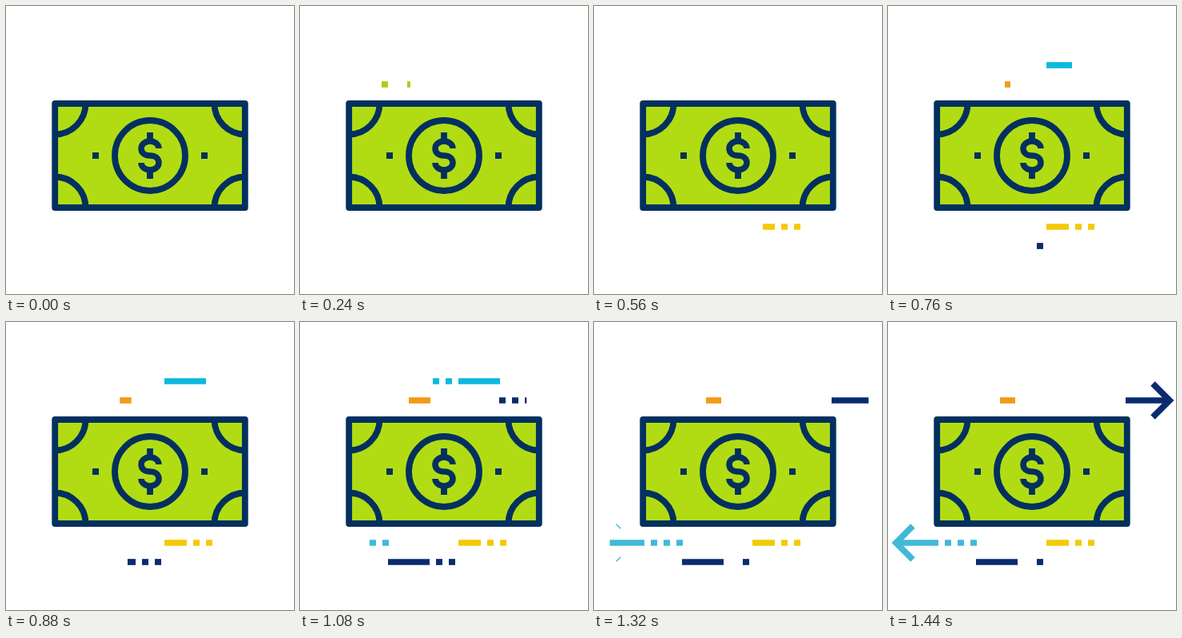
An HTML page that plays this animation: 360 by 360 pixels, repeating every 1.48 s.

```html
<!DOCTYPE html>
<html lang="en">
<head>
<meta charset="utf-8">
<title>Money transfer</title>
<style>
  html, body { margin: 0; width: 100%; height: 100%; overflow: hidden; background: #fff; }
  svg { display: block; width: 100vw; height: 100vh; }
</style>
</head>
<body>
<svg viewBox="0 0 360 360">
  <clipPath id="inside"><rect x="61" y="122" width="238" height="130"/></clipPath>
  <g id="trails" fill="none" stroke-width="7.7"></g>
  <g fill="none" stroke="#03305f" stroke-width="7.8" stroke-linejoin="round">
    <rect x="61.2" y="122" width="237.6" height="130" fill="#b1dc14"/>
    <g clip-path="url(#inside)">
      <circle cx="61" cy="122" r="38.5"/>
      <circle cx="299" cy="122" r="38.5"/>
      <circle cx="61" cy="252" r="38.5"/>
      <circle cx="299" cy="252" r="38.5"/>
    </g>
    <circle cx="180" cy="187" r="44"/>
    <path d="M180 158v11M180 205v11M108 187h8M244 187h8"/>
    <path stroke-width="7.5" d="M191 178A11 9 0 0 0 169 178C169 184 174 187 180 187S191 190 191 196A11 9 0 0 1 169 196"/>
  </g>
</svg>
<script>
const LOOP = 1480, STEP = 40;
const SPEED = 0.25; // px per ms, shared by every trail
const PITCH = 16, DOT = 8;
const green = '#a5d01b', yellow = '#f4ca07', cyan = '#0cb8dd', sky = '#41b9d7',
      orange = '#f39a18', navy = '#0a2b6d';

const clamp = (v, lo = 0, hi = 1) => Math.max(lo, Math.min(hi, v));

function newPath(color) {
  const el = document.createElementNS('http://www.w3.org/2000/svg', 'path');
  el.setAttribute('stroke', color);
  return document.getElementById('trails').appendChild(el);
}

// A row of dots followed by a line, uncovered by an edge that leaves `from`
// at `start`; a second edge wipes it away from `end` on.
const trails = [];
function trail({ y, color, dir, from, start, dots = 0, line = 0, end = Infinity }) {
  const parts = Array.from({ length: dots }, (_, i) => [i * PITCH, i * PITCH + DOT]);
  if (line) parts.push([dots * PITCH, dots * PITCH + line]);
  trails.push({ el: newPath(color), y, dir, from, start, end, parts });
}

function trailPath({ y, dir, from, start, end, parts }, t) {
  const head = Math.max(0, (t - start) * SPEED);
  const tail = Math.max(0, (t - end) * SPEED);
  return parts.map(([a, b]) => {
    const lo = Math.max(a, tail), hi = Math.min(b, head);
    return hi > lo ? `M${from + dir * lo} ${y}H${from + dir * hi}` : '';
  }).join('');
}

trail({ y: 98, color: green, dir: 1, from: 102, start: 96, dots: 1, end: 260 });
trail({ y: 98, color: green, dir: 1, from: 134, start: 224, line: 4, end: 260 });

trail({ y: 276, color: yellow, dir: -1, from: 258, start: 372, dots: 2, line: 28 });
trail({ y: 276, color: green, dir: -1, from: 258, start: 372, dots: 1, end: 410 });

trail({ y: 74, color: cyan, dir: 1, from: 198, start: 632, line: 52, end: 1100 });
trail({ y: 74, color: cyan, dir: -1, from: 190, start: 950, dots: 2, end: 1100 });

trail({ y: 300, color: navy, dir: -1, from: 194, start: 712, dots: 1 });
trail({ y: 300, color: navy, dir: -1, from: 178, start: 776, dots: 1, end: 1100 });
trail({ y: 300, color: navy, dir: -1, from: 162, start: 840, line: 52 });

trail({ y: 98, color: navy, dir: 1, from: 249, start: 943, dots: 3, end: 1100 });
trail({ y: 98, color: navy, dir: 1, from: 297, start: 1135, line: 55 });
trail({ y: 276, color: sky, dir: -1, from: 111, start: 955, dots: 3, line: 53 });

// Arrowhead arms grow from their outer ends to the tip
const ARM = 21, ARM_TIME = 110;
const arrows = [
  { el: newPath(navy), x: 352, y: 98, dir: 1, start: 1325 },
  { el: newPath(sky), x: 10, y: 276, dir: -1, start: 1315 }
];

function arrowPath({ x, y, dir, start }, t) {
  const p = clamp((t - start) / ARM_TIME);
  if (!p) return '';
  const bx = x - dir * ARM, px = bx + dir * ARM * p, gap = ARM * (1 - p);
  return `M${bx} ${y - ARM}L${px} ${y - gap}M${bx} ${y + ARM}L${px} ${y + gap}` +
    (p === 1 ? `M${bx} ${y - ARM}L${x} ${y}L${bx} ${y + ARM}` : '');
}

// The orange dash swells from its middle, then settles back
const pulse = newPath(orange);
function pulsePath(t) {
  const w = 27 * clamp((t - 650) / 430) - 8 * clamp((t - 1080) / 240);
  return w > 0 ? `M${149.5 - w / 2} 98h${w}` : '';
}

function draw(time) {
  const t = Math.floor((time % LOOP) / STEP) * STEP;
  for (const tr of trails) tr.el.setAttribute('d', trailPath(tr, t));
  for (const a of arrows) a.el.setAttribute('d', arrowPath(a, t));
  pulse.setAttribute('d', pulsePath(t));
}

const begin = performance.now();
function tick() {
  draw(performance.now() - begin);
  requestAnimationFrame(tick);
}
tick();
</script>
</body>
</html>
```
